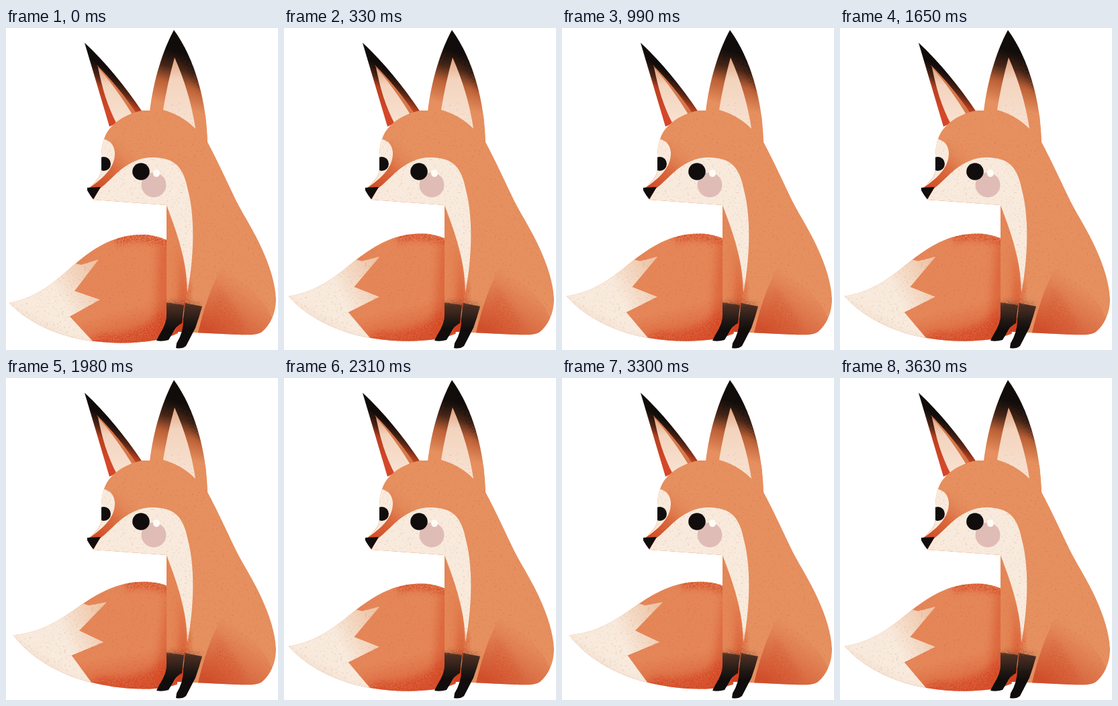
An HTML page for the animation above (3960 ms loop, 405 by 480 pixels).

```html
<!DOCTYPE html>
<html lang="en">
<head>
<meta charset="utf-8">
<title>Fox wagging its tail</title>
<style>
  html, body { margin: 0; width: 100%; height: 100%; overflow: hidden; background: #fff; }
  svg { display: block; width: 100vw; height: 100vh; }
  .fur { fill: #e68f5f; }
  .cream { fill: #f8eadc; }
  .black { fill: #100d0c; }
  .red { fill: #d2401f; }
</style>
</head>
<body>
<svg viewBox="0 0 405 480">
  <defs>
    <linearGradient id="nearEar" gradientUnits="userSpaceOnUse" x1="256" y1="18" x2="228" y2="122">
      <stop offset=".15" stop-color="#120d0b"/>
      <stop offset=".38" stop-color="#4a2718"/>
      <stop offset=".6" stop-color="#bd6137"/>
      <stop offset=".9" stop-color="#e68f5f"/>
    </linearGradient>
    <linearGradient id="farEar" gradientUnits="userSpaceOnUse" x1="135" y1="35" x2="99" y2="93">
      <stop offset=".2" stop-color="#120d0b"/>
      <stop offset=".45" stop-color="#552617"/>
      <stop offset=".62" stop-color="#b8401f"/>
      <stop offset="1" stop-color="#d5472a"/>
    </linearGradient>
    <linearGradient id="innerEar" x1="0" y1="0" x2="0" y2="1">
      <stop offset="0" stop-color="#dfa07c"/>
      <stop offset=".3" stop-color="#f3d3bd"/>
      <stop offset="1" stop-color="#f8e3d2"/>
    </linearGradient>
    <linearGradient id="muzzle" gradientUnits="userSpaceOnUse" x1="130" y1="242" x2="190" y2="178">
      <stop offset="0" stop-color="#cf4a24"/>
      <stop offset=".5" stop-color="#db6c40"/>
      <stop offset="1" stop-color="#e68f5f" stop-opacity="0"/>
    </linearGradient>
    <linearGradient id="sock" gradientUnits="userSpaceOnUse" x1="0" y1="406" x2="0" y2="450">
      <stop offset="0" stop-color="#5b3524" stop-opacity=".7"/>
      <stop offset=".2" stop-color="#4d3024"/>
      <stop offset=".7" stop-color="#211814"/>
      <stop offset="1" stop-color="#100d0c"/>
    </linearGradient>
    <linearGradient id="haunch" gradientUnits="userSpaceOnUse" x1="350" y1="375" x2="300" y2="450">
      <stop offset="0" stop-color="#d2552f" stop-opacity="0"/>
      <stop offset="1" stop-color="#cc4524" stop-opacity=".85"/>
    </linearGradient>
    <linearGradient id="tailShade" gradientUnits="userSpaceOnUse" x1="170" y1="395" x2="192" y2="470">
      <stop offset=".3" stop-color="#d2401f" stop-opacity="0"/>
      <stop offset="1" stop-color="#cf3518"/>
    </linearGradient>
    <linearGradient id="tailTip" gradientUnits="userSpaceOnUse" x1="82" y1="405" x2="140" y2="370">
      <stop offset="0" stop-color="#f8eadc"/>
      <stop offset="1" stop-color="#efc4a6"/>
    </linearGradient>

    <filter id="soft" x="-50%" y="-50%" width="200%" height="200%"><feGaussianBlur stdDeviation="6"/></filter>
    <!-- Chalky shading: the shape broken up by noise. -->
    <filter id="chalk" x="-30%" y="-30%" width="160%" height="160%" color-interpolation-filters="sRGB">
      <feGaussianBlur in="SourceGraphic" stdDeviation="4" result="shape"/>
      <feTurbulence type="fractalNoise" baseFrequency=".55" numOctaves="2" seed="4"/>
      <feColorMatrix values="0 0 0 0 0  0 0 0 0 0  0 0 0 0 0  5 0 0 0 -1.9" result="noise"/>
      <feComposite in="shape" in2="noise" operator="in"/>
    </filter>
    <!-- Sparse paper specks inside the shape. -->
    <filter id="specks" x="0" y="0" width="100%" height="100%" color-interpolation-filters="sRGB">
      <feTurbulence type="fractalNoise" baseFrequency=".3 .4" numOctaves="4" seed="9"/>
      <feColorMatrix values="0 0 0 0 0  0 0 0 0 0  0 0 0 0 0  6 0 0 0 -3.8" result="noise"/>
      <feComposite in="SourceGraphic" in2="noise" operator="in"/>
    </filter>

    <path id="tailShape" d="M5 410C46 402 72 379 99 355C127 331 158 307 207 308C224 309 240 315 258 326L256 455C244 460 236 463 224 465C196 470 165 471 131 467C79 461 34 440 5 410Z"/>
    <path id="bodyShape" d="M142 213V190C142 173 147 157 157 147C170 133 188 126 203 123H214L260 110L297 130L300 170C315 198 329 229 343 258C356 283 370 304 381 329C392 353 401 380 402 404C402 426 393 443 381 453C372 459 355 457 343 457L280 454L262 452L239 437V264L130 256L121 241C131 232 140 224 142 213Z"/>
    <path id="nearEarShape" d="M250 3C233 34 219 80 214 124L250 145L300 172C299 112 282 47 250 3Z"/>
    <path id="farEarShape" d="M117 22L154 147L203 125C176 85 148 51 117 22Z"/>
    <path id="cheek" d="M130 256L140 239C151 231 159 221 170 212C186 199 203 192 220 193C250 194 264 205 271 242C281 280 281 337 270 395C270 350 256 308 239 264Z"/>
    <clipPath id="tailClip"><use href="#tailShape"/></clipPath>
    <clipPath id="bodyClip"><use href="#bodyShape"/></clipPath>
    <clipPath id="nearEarClip"><use href="#nearEarShape"/></clipPath>
    <clipPath id="farEarClip"><use href="#farEarShape"/></clipPath>
  </defs>

  <g id="tail">
    <use href="#tailShape" class="fur"/>
    <g clip-path="url(#tailClip)">
      <path class="red" d="M90 300H262V480H90Z" opacity=".1"/>
      <path d="M90 385H262V480H90Z" fill="url(#tailShade)" opacity=".5"/>
      <path class="red" d="M140 456Q195 460 235 420L262 475L110 482Z" filter="url(#chalk)" opacity=".75"/>
      <path class="red" d="M160 306Q205 298 262 316V338Q205 308 165 325Z" filter="url(#chalk)" opacity=".8"/>
      <path class="red" d="M226 325H260V460H222Z" filter="url(#soft)" opacity=".4"/>
      <path d="M0 330L112 353L138 345L102 392L140 405L95 430L131 469L0 480Z" fill="url(#tailTip)"/>
      <path d="M0 412L95 460L130 470V480H0Z" fill="#e9cdb8" filter="url(#chalk)" opacity=".5"/>
      <use href="#tailShape" fill="#a63c20" filter="url(#specks)" opacity=".16"/>
    </g>
  </g>

  <use href="#farEarShape" fill="url(#farEar)"/>
  <g clip-path="url(#farEarClip)">
    <path class="black" d="M112 15L153 52L178 91L132 52L140 85Z" filter="url(#chalk)" opacity=".6"/>
    <path d="M135 55C156 76 177 101 196 130L182 138Z" fill="#d8784b"/>
    <path d="M137 59C156 80 173 104 190 132L166 145C150 115 143 88 137 59Z" fill="url(#innerEar)"/>
  </g>

  <use href="#bodyShape" class="fur"/>
  <use href="#nearEarShape" fill="url(#nearEar)"/>
  <g clip-path="url(#nearEarClip)">
    <path class="black" d="M250 0L285 50L297 105L268 56L248 36L232 66Z" filter="url(#chalk)" opacity=".6"/>
  </g>
  <path d="M251 44Q240 84 234 122Q262 130 282 150Q274 96 251 44Z" fill="url(#innerEar)"/>

  <g clip-path="url(#bodyClip)">
    <path d="M120 243L160 164L218 166L218 194Q176 200 132 257Z" fill="url(#muzzle)"/>
    <path class="cream" d="M136 164Q160 165 162 185C163 206 148 222 123 239L130 222Z"/>
    <circle class="black" cx="145.500" cy="202.500" r="10.500"/>
    <path class="red" d="M256 325Q272 365 268 418H253Q264 370 256 325Z" filter="url(#soft)" opacity=".5"/>
    <path class="red" d="M238 264L256 312L268 360V420H238Z" opacity=".12"/>
    <use href="#cheek" class="cream"/>
    <path d="M322 355C307 382 295 415 285 458H402Q396 400 322 355Z" fill="url(#haunch)"/>
    <path class="red" d="M318 385L298 450H355L350 432Z" filter="url(#chalk)" opacity=".3"/>
    <path class="red" d="M268 383Q266 410 262 455L272 440L275 380Z" filter="url(#chalk)" opacity=".5"/>
    <use href="#bodyShape" fill="#a94c2b" filter="url(#specks)" opacity=".16"/>
  </g>

  <path class="red" d="M258 432L267 432L263 453L252 453Z"/>
  <path d="M239 409L265 413L262 440Q253 444 248 455L242 465Q232 468 224 466L228 458Q240 440 239 425Z" fill="url(#sock)"/>
  <path d="M267 410L292 415Q288 430 282 447L268 474Q262 479 253 477L254 470Q265 452 264 432Z" fill="url(#sock)"/>
  <path d="M241 407L290 411L286 424L241 419Z" fill="#3a241b" filter="url(#chalk)" opacity=".5"/>

  <path class="black" d="M121 238L141 237L130 255Q126 251 121 242Z"/>
  <circle cx="220" cy="234" r="18.500" fill="#e0bcb6"/>
  <circle class="black" cx="201" cy="214" r="12.800"/>
  <ellipse cx="224" cy="216.500" rx="5" ry="5.500" fill="#fffaf5"/>
</svg>
<script>
  const STEP = 330;
  const ANGLES = [0, 2.5, 6.6, 2.5];
  const tail = document.getElementById('tail');

  function draw() {
    const pose = Math.floor(performance.now() / STEP) % ANGLES.length;
    tail.setAttribute('transform', `rotate(${ANGLES[pose]} 240 445)`);
    requestAnimationFrame(draw);
  }
  draw();
</script>
</body>
</html>
```
